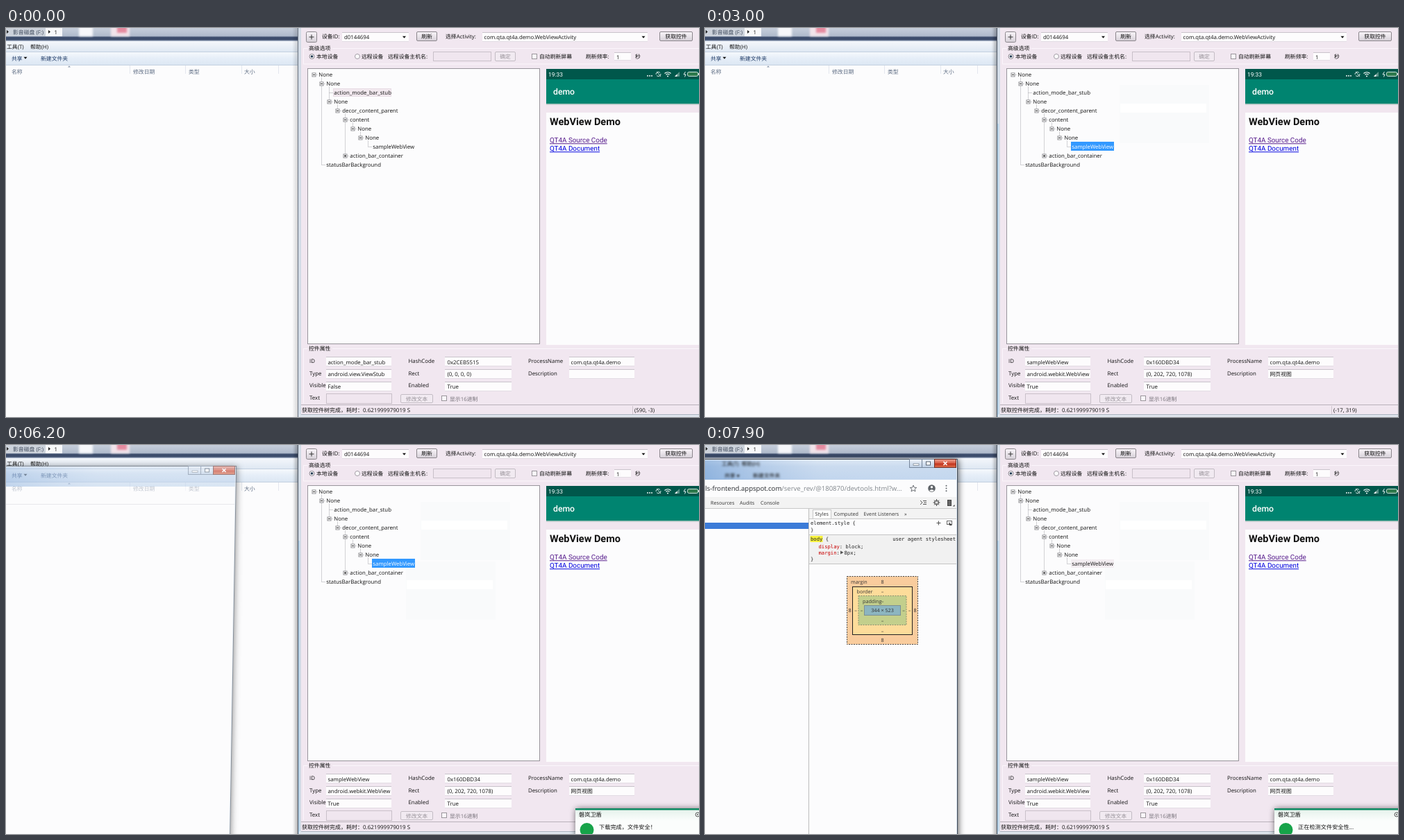
Write an HTML page that moves like this. It is 998 by 561 pixels and loops after 8 s.

```html
<!DOCTYPE html>
<html lang="zh-CN">
<head>
<meta charset="utf-8">
<title>Control inspector</title>
<style>
html, body { margin: 0; width: 100%; height: 100%; overflow: hidden; background: #fcfcfd; }
svg { display: block; width: 998px; height: 561px; }
text {
  font: 7.85px "Open Sans", "Noto Sans CJK SC", "Noto Sans CJK JP", "Noto Sans CJK", sans-serif;
  fill: #111; text-rendering: geometricPrecision; white-space: pre;
}
.mid { text-anchor: middle; }
.end { text-anchor: end; }
.dim { fill: #9a949b; }
.soft { fill: #5c6b82; }
.white { fill: #fff; }
.ph { font-family: Roboto, sans-serif; }
.link { font-size: 9.87px; text-decoration: underline; }
.url { font-size: 9.55px; fill: #80868b; }
.dev { font-size: 7.2px; fill: #333; }
.mono { font-family: "DejaVu Sans Mono", monospace; font-size: 7.2px; fill: #222; }
.blur { filter: blur(1.6px); }
.lift { filter: drop-shadow(2px 2px 1px rgba(0,0,0,.55)); }
.drop { filter: drop-shadow(1px 1px 5px rgba(0,0,0,.65)); }

.a { animation: 8s step-end -20ms infinite; }
.focus { animation-name: focus; }
.before { animation-name: before; }
.after { animation-name: after; }
.sel { animation-name: sel; }
.blurred { animation-name: blurred; }
.menu1 { animation-name: menu1; }
.items1 { animation-name: items1; }
.hover1 { animation-name: hover1; }
.mark1 { animation-name: mark1; }
.menu2 { animation-name: menu2; }
.hover2 { animation-name: hover2; }
.pick2 { animation-name: pick2; }
.mark2 { animation-name: mark2; }
.toast { animation-name: toast; }
.done { animation-name: done; }
.scan { animation-name: scan; }
.win { animation-name: win; }
.frost { animation-name: frost; }
.bar { animation-name: bar; }
.url1 { animation-name: url1; }
.url2 { animation-name: url2; }
.d1 { animation-name: d1; } .d2 { animation-name: d2; } .d3 { animation-name: d3; }
.d4 { animation-name: d4; } .d5 { animation-name: d5; }

@keyframes focus { 0% { opacity: 0 } 25%, 100% { opacity: 1 } }
@keyframes before { 0% { opacity: 1 } 36.25%, 100% { opacity: 0 } }
@keyframes after { 0% { opacity: 0 } 36.25%, 100% { opacity: 1 } }
@keyframes sel { 0% { opacity: 0 } 36.25% { opacity: 1 } 98.75%, 100% { opacity: 0 } }
@keyframes blurred { 0% { opacity: 0 } 98.75%, 100% { opacity: 1 } }
@keyframes menu1 { 0% { opacity: 0 } 25% { opacity: 1 } 35% { opacity: .55 } 36.25% { opacity: .2 } 37.5%, 100% { opacity: 0 } }
@keyframes items1 { 0% { opacity: 0 } 25% { opacity: .13 } 26.25% { opacity: .4 } 27.5% { opacity: .7 } 28.75%, 100% { opacity: 1 } }
@keyframes hover1 {
  0% { opacity: 0; transform: translateY(-13px) }
  28.75% { opacity: 1; transform: translateY(-13px) }
  31.25%, 100% { opacity: 1; transform: none }
}
@keyframes mark1 { 0% { opacity: 0 } 35%, 100% { opacity: 1 } }
@keyframes menu2 { 0% { opacity: 0 } 51.25% { opacity: .5 } 52.5% { opacity: 1 } 63.75%, 100% { opacity: 0 } }
@keyframes hover2 {
  0% { opacity: 0; transform: none }
  56.25% { opacity: 1; transform: translateY(-26px) }
  57.5% { opacity: 1; transform: translateY(-13px) }
  58.75%, 100% { opacity: 1; transform: none }
}
@keyframes pick2 { 0% { opacity: 0 } 63.75% { opacity: .75 } 65% { opacity: .35 } 66.25%, 100% { opacity: 0 } }
@keyframes mark2 { 0% { opacity: 0 } 63.75%, 100% { opacity: 1 } }
@keyframes toast {
  0% { opacity: 0; transform: translateY(44px) }
  68.75% { opacity: 1; transform: translateY(30px) }
  70% { opacity: 1; transform: translateY(18px) }
  71.25% { opacity: 1; transform: translateY(8px) }
  72.5%, 100% { opacity: 1; transform: none }
}
@keyframes done { 0% { opacity: 1 } 80%, 100% { opacity: 0 } }
@keyframes scan { 0% { opacity: 0 } 80%, 100% { opacity: 1 } }
@keyframes win {
  0% { opacity: 0; transform: none }
  77.5% { opacity: .62; transform: translate(-31.5px, 10px) skewX(-.97deg) }
  78.75% { opacity: .85; transform: translate(-25px, 6px) skewX(-.45deg) }
  80% { opacity: .96; transform: translate(-21px, 4px) skewX(-.1deg) }
  81.25% { opacity: 1; transform: translate(-20px, 3px) }
  98.75%, 100% { opacity: 1; transform: none }
}
@keyframes frost { 0% { opacity: 0 } 80%, 100% { opacity: 1 } }
@keyframes bar { 0% { opacity: 0 } 83.75%, 100% { opacity: 1 } }
@keyframes url1 { 0% { opacity: 1 } 87.5%, 100% { opacity: 0 } }
@keyframes url2 { 0% { opacity: 0 } 87.5%, 100% { opacity: 1 } }
@keyframes d1 { 0% { opacity: 0 } 90%, 100% { opacity: 1 } }
@keyframes d2 { 0% { opacity: 0 } 91.25%, 100% { opacity: 1 } }
@keyframes d3 { 0% { opacity: 0 } 92.5%, 100% { opacity: 1 } }
@keyframes d4 { 0% { opacity: 0 } 93.75%, 100% { opacity: 1 } }
@keyframes d5 { 0% { opacity: 0 } 95%, 100% { opacity: 1 } }
</style>
</head>
<body>
<svg id="stage" viewBox="0 0 998 561"></svg>
<script>
const text = (x, y, s, cls = '', extra = '') => `<text x="${x}" y="${y}" class="${cls}" ${extra}>${s}</text>`;
const rect = (x, y, w, h, fill, stroke = 'none', extra = '') =>
  `<rect x="${x}" y="${y}" width="${w}" height="${h}" fill="${fill}" stroke="${stroke}" ${extra}/>`;
const path = (d, stroke, width = 1, fill = 'none', extra = '') =>
  `<path d="${d}" stroke="${stroke}" stroke-width="${width}" fill="${fill}" ${extra}/>`;
const dot = (x, y, r, fill, stroke = 'none') => `<circle cx="${x}" cy="${y}" r="${r}" fill="${fill}" stroke="${stroke}"/>`;
const group = (cls, ...parts) => `<g class="${cls}">${parts.join('')}</g>`;
const anim = (name, ...parts) => group('a ' + name, ...parts);
const grad = (id, dir, ...stops) =>
  `<linearGradient id="${id}" x1="0" y1="0" x2="${dir === 'h' ? 1 : 0}" y2="${dir === 'h' ? 0 : 1}">` +
  stops.map(([o, c, a = 1]) => `<stop offset="${o}" stop-color="${c}" stop-opacity="${a}"/>`).join('') + '</linearGradient>';
const arrow = (x, y) => path(`M${x - 2.5} ${y - 1.3}h5l-2.5 3z`, 'none', 0, '#111');
const button = (x, y, w, h, s, off) =>
  rect(x + .5, y + .5, w - 1, h - 1, off ? '#f1eaf1' : 'url(#btn)', off ? '#c3bcc4' : '#8b868c', 'rx="1.5"') +
  text(x + w / 2, y + h / 2 + 3.2, s, off ? 'mid dim' : 'mid');
const field = (x, y, w, h, off) =>
  off ? rect(x + .5, y + .5, w - 1, h - 1, '#f0e6ef', '#c9c0c9')
      : rect(x, y, w, h, '#fdfcfd') + path(`M${x} ${y + .5}h${w}`, '#c9c3cb') + path(`M${x} ${y + h - .5}h${w}`, '#e2dce4');
const check = (x, y) => rect(x + .5, y + .5, 7, 7, '#faf7fa', '#9a959b');

const defs = '<defs>' +
  grad('btn', 'v', [0, '#f8f4f8'], [.5, '#e9e4ea'], [1, '#d5cfd7']) +
  grad('strip', 'v', [0, '#c6cedb'], [.6, '#b0bbcc'], [.7, '#40506f'], [.88, '#3a4a69'], [1, '#b9c5d8']) +
  grad('menubar', 'v', [0, '#f4f7fb'], [1, '#dfe8f3']) +
  grad('tools', 'v', [0, '#f7fafd'], [.5, '#e6eef8'], [1, '#dce7f3']) +
  grad('shade', 'h', [0, '#000', 0], [1, '#000', .17]) +
  grad('glass', 'v', [0, '#d3e1f2'], [.35, '#b3cbe8'], [1, '#a6c3e6']) +
  grad('shine', 'h', [0, '#6f9dd4', .45], [.45, '#fff', .3], [1, '#dfeaf6', .5]) +
  grad('close', 'v', [0, '#eda292'], [.45, '#d9614a'], [.55, '#c2331d'], [1, '#e0734f']) +
  grad('cap', 'v', [0, '#f1f5fa'], [.5, '#d5e0ee'], [1, '#bfd0e6']) +
  grad('tip', 'v', [0, '#e3f1ea'], [1, '#fbfdfc']) +
  '</defs>';

const explorer = () => rect(0, 0, 421, 561, '#fcfcfd') +
  rect(0, 0, 421, 19, 'url(#strip)') +
  rect(0, 0, 57, 12, '#ccd2db') + rect(57, 0, 24, 12, '#f7f8fa') +
  group('blur', rect(105, -3, 20, 15, '#f6f7fa'), rect(151, -3, 27, 15, '#f1e3ea'), rect(160, -3, 14, 10, '#e58ba0')) +
  path('M1 3l3 2.5l-3 2.5z', 'none', 0, '#222') + path('M61 3l3 2.5l-3 2.5z', 'none', 0, '#222') +
  text(10, 8.5, '影音磁盘 (F:)', '', 'style="fill:#3f4a5c"') + text(69.5, 8.5, '1') +
  rect(0, 19, 421, 15, 'url(#menubar)') + text(1, 30, '工具(T)') + text(35, 30, '帮助(H)') +
  rect(0, 34, 421, 19, 'url(#tools)') + path('M0 34.5h421M0 53.5h421', '#c3d0e0') +
  text(8, 46.5, '共享', '', 'style="fill:#1e3a66"') + arrow(28, 43) +
  text(50, 46.5, '新建文件夹', '', 'style="fill:#1e3a66"') +
  path('M89 56.5l2-2l2 2z', 'none', 0, '#7f8fa5') +
  [178.5, 258.5, 339.5, 392.5].map(x => path(`M${x} 54v12`, '#e3e7ee')).join('') +
  [[8, '名称'], [183, '修改日期'], [263, '类型'], [343, '大小']].map(([x, s]) => text(x, 66, s, 'soft')).join('');

const rows = [
  [0, 'None', '-'], [1, 'None', '-'], [2, 'action_mode_bar_stub'], [2, 'None', '-'], [3, 'decor_content_parent', '-'],
  [4, 'content', '-'], [5, 'None', '-'], [6, 'None', '-'], [7, 'sampleWebView'], [4, 'action_bar_container', '+'], [1, 'statusBarBackground']
];
const colX = d => Math.round(443 + 11.2 * d) + .5;
const rowY = i => 67 + 13 * i;
// last child row of each open node
const lastChild = { 0: 10, 1: 3, 3: 4, 4: 9, 5: 6, 6: 7, 7: 8 };
// pale patch that a closed menu leaves on the tree
const residue = (x, y) => rect(x - 1, y, 129, 84, '#f9fafb') + rect(x, y + 27, 124, 13, '#fff');
const tree = () => {
  let lines = '', nodes = '';
  rows.forEach(([d, label, box], i) => {
    const x = colX(d), y = rowY(i) + .5;
    lines += path(`M${x} ${y}h6`, '#a9a9ad', 1, 'none', 'stroke-dasharray="1 1"');
    if (i in lastChild) lines += path(`M${colX(d + 1)} ${y + 4}V${rowY(lastChild[i])}`, '#a9a9ad', 1, 'none', 'stroke-dasharray="1 1"');
    if (box) nodes += rect(x - 2.5, y - 2.5, 5, 5, '#fff', '#8d8d92') + path(`M${x - 1.5} ${y}h3` + (box === '+' ? `M${x} ${y - 1.5}v3` : ''), '#333');
    nodes += text(x + 6.8, y + 2.3, label);
  });
  return rect(434.5, 58.5, 334, 397, '#fcfcfd', '#98949b') +
    anim('mark1', residue(598, 82)) + anim('mark2', residue(577, 168)) +
    anim('before', rect(471.5, 87.5, 83, 11, '#f2e9ef', '#e8dde5')) +
    anim('blurred', rect(527, 165, 62, 12, '#f3edf1')) +
    lines + nodes +
    anim('sel', rect(527, 164, 62, 13, '#3399ff'), text(colX(7) + 6.8, rowY(8) + 2.8, 'sampleWebView', 'white'));
};

const values = (id, type, shown, hash, box, desc) =>
  text(463.5, 484.5, id) + text(463.5, 502, type) + text(463.5, 519.5, shown) +
  text(635.5, 484.5, hash) + text(635.5, 502, box) + text(813.5, 502, desc);

const props = () =>
  text(436, 465, '控件属性') + path('M470 462.5H998M428.5 462.5h6M428.5 462.5V541', '#fbf6fb') +
  ['ID', 'Type', 'Visible', 'Text'].map((s, i) => text(437, 482.8 + 17.7 * i, s)).join('') +
  ['HashCode', 'Rect', 'Enabled'].map((s, i) => text(579.5, 482.8 + 17.7 * i, s)).join('') +
  text(752, 482.8, 'ProcessName') + text(752, 500.5, 'Description') +
  [474, 492, 510].map(y => field(461, y, 94, 14) + field(632, y, 96, 14)).join('') +
  field(811, 474, 94, 14) + field(811, 492, 94, 14) + field(461, 527, 95, 15, true) +
  text(635.5, 519.5, 'True') + text(813.5, 484.5, 'com.qta.qt4a.demo') +
  anim('before', values('action_mode_bar_stub', 'android.view.ViewStub', 'False', '0x2CEB5515', '(0, 0, 0, 0)', '')) +
  anim('after', values('sampleWebView', 'android.webkit.WebView', 'True', '0x160DBD34', '(0, 202, 720, 1078)', '网页视图')) +
  button(568, 528, 47, 13, '修改文本', true) + check(627, 530) + text(639, 537.5, '显示16进制', '', 'style="fill:#77727a"');

const phone = () =>
  rect(778, 59, 220, 398, '#fcfcfd') + rect(778, 59, 220, 15, '#00574b') + rect(778, 74, 220, 35, '#008470') +
  rect(778, 109, 220, 13, '#f1e6ef') + rect(778, 109, 220, 1.5, '#9dbdb6') +
  text(781, 69.8, '19:33', 'ph white', 'style="font-size:8.4px"') +
  [924, 927, 930].map(x => dot(x, 69, .9, '#fff')).join('') +
  path('M936 67a3.5 3.5 0 0 1 6-2.5M943 66a3.5 3.5 0 0 1-6 2.6M937 63l6 7', '#d9e8e5') +
  path('M948.5 65.5a6.5 6.5 0 0 1 9 0M950.5 67.5a3.6 3.6 0 0 1 5 0', '#fff', 1.1) + dot(953, 69.6, 1, '#fff') +
  path('M963 70l7-7v7z', 'none', 0, '#5c938a') + path('M963 70l3.5-3.5v3.5z', 'none', 0, '#fff') +
  path('M978.5 63l-2.5 4h3l-1.5 3.5', '#fff', .9) +
  rect(981.5, 63.5, 15, 6, '#2f7a4d', '#cfe3dd', 'rx="2"') + rect(997, 65, 1, 3, '#cfe3dd') +
  text(788, 96.3, 'demo', 'ph white', 'style="font-size:12.2px;font-weight:500"') +
  text(783, 140, 'WebView Demo', 'ph', 'style="font-size:14.5px;font-weight:700"') +
  text(783, 165.3, 'QT4A Source Code', 'ph link', 'style="fill:#551a8b"') +
  text(783, 177.3, 'QT4A Document', 'ph link', 'style="fill:#0000e0"');

const inspector = () => rect(412, 0, 9, 561, 'url(#shade)') +
  anim('focus', rect(414, 0, 7, 561, 'url(#shade)')) +
  rect(421, 0, 577, 561, '#f1e7f0') + rect(420, 0, 1, 561, '#6b7481') + rect(421, 0, 4, 561, '#d3dce7') +
  anim('focus', rect(420, 0, 1, 561, '#4b5563'), rect(421, 138, 2, 423, '#b5d2e8')) +
  rect(432.5, 5.5, 15, 15, 'url(#btn)', '#8b868c', 'rx="2"') + path('M436.5 13h7M440 9.5v7', '#333') +
  text(455, 15.3, '设备ID:') + field(484, 6, 96, 14) + text(487, 16, 'd0144694') + arrow(573.5, 13) +
  button(591, 5, 30, 14, '刷新') + text(633, 15.3, '选择Activity:') +
  field(686, 6, 238, 14) + text(688.5, 16, 'com.qta.qt4a.demo.WebViewActivity') + arrow(918, 13) +
  button(941, 5, 48, 14, '获取控件') +
  text(436, 32, '高级选项') + path('M470 29.5H998M428.5 29.5h6M428.5 29.5V52H998', '#fbf6fb') +
  dot(440.5, 41, 3.5, '#fdfcfd', '#86818a') + dot(440.5, 41, 1.8, '#223a52') + text(447, 44, '本地设备') +
  dot(506, 41, 3.5, '#fdfcfd', '#a09aa3') + text(512, 44, '远程设备') + text(550, 44, '远程设备主机名:') +
  field(615, 34, 84, 14, true) + button(704, 34, 30, 14, '确定', true) +
  check(757, 37) + text(768, 44, '自动刷新屏幕') + text(835, 44, '刷新频率:') +
  field(876, 35, 24, 12) + text(879, 44.5, '1') + text(906, 44, '秒') +
  tree() + phone() + props() +
  path('M425 543.5H998', '#b9b1ba') + path('M902.5 545v12', '#cfc6cf') + rect(422, 557.5, 576, 3.5, '#dfe5ed') + path('M425 557.5H998', '#aab3bf') +
  text(426, 554.4, '获取控件树完成，耗时：0.621999979019 S', '', 'style="font-size:8px"') + text(905, 554.4, '', '', 'id="pos"');

const items = ['生成控件QPath', '输入QPath定位', '查找WebView控件', '启动WebView调试', '打开WebView命令行', '切换控件树[2/2]'];
const panel = () => rect(598, 82, 125, 81, '#fafafc', '#d9d9de', 'class="lift"');
const labels = () => items.map((s, i) => text(617, 93 + 13 * i, s)).join('');
const hover = y => rect(598.5, y + .5, 123, 12, '#eaf2fb', '#b4cde8', 'rx="1"');
const menus = () =>
  anim('menu1', panel(), anim('hover1', hover(109)), anim('items1', labels())) +
  '<g transform="translate(-21.5 86)">' +
  anim('menu2', panel(), anim('hover2', hover(122)), labels()) +
  anim('pick2', hover(122), text(617, 132, items[3])) + '</g>';

const toast = () => anim('toast',
  rect(820, 524, 190, 60, '#fbfdfc', 'none', 'class="drop"') + rect(820, 524, 178, 18, 'url(#tip)') + rect(820, 524, 178, 2.5, '#0d8a62'),
  text(825, 536.3, '磐岚卫盾', '', 'style="font-size:8.2px"'),
  dot(996, 533, 3, 'none', '#555') + dot(996, 533, 1, '#555'),
  dot(836.5, 555, 10, '#16a349'),
  anim('done', text(854, 554, '下载完成，文件安全！', '', 'style="font-size:8.2px"')),
  anim('scan', text(854, 554, '正在检测文件安全性...', '', 'style="font-size:8.2px"')));

const dev = (x, y, s, cls = '') => text(x, y, s, 'dev ' + cls);
const mono = (x, y, s, cls = '') => text(x, y, s, 'mono ' + cls);
const layer = (x, y, w, h, fill, line, dash) => rect(x + .5, y + .5, w - 1, h - 1, fill, line, dash ? 'stroke-dasharray="2 1.5"' : '');
const red = s => `<tspan fill="#c80000">${s}</tspan>`;

const devtools = () =>
  anim('d1', rect(-60, 75, 422, 16, '#f3f3f3'), path('M-60 91.5H362', '#c8c8c8'),
    dev(8, 85.6, 'Resources'), dev(50, 85.6, 'Audits'), dev(80, 85.6, 'Console'),
    path('M310 80l3 3l-3 3M314 80.5h5M315 83h4M314 85.5h5', '#555'),
    dot(333.5, 83, 3.2, 'none', '#555'), path('M333.5 78v10M328.5 83h10M330 79.5l7 7M337 79.5l-7 7', '#555', 1), dot(333.5, 83, 1.4, '#f3f3f3'),
    rect(349.5, 79.5, 5, 8, '#666', '#444'), path('M357 88.5h2.5v-2.5z', 'none', 0, '#333')) +
  anim('d2', rect(-60, 112, 209, 9, '#3b7bd8'), path('M149.5 92V561', '#bdbdbd')) +
  anim('d3', rect(150, 92, 212, 14, '#f3f3f3'), path('M150 106.5H362', '#c8c8c8'),
    rect(155.5, 93.5, 26, 13, '#fff', '#c8c8c8'), dev(158.5, 102, 'Styles'), dev(185.5, 102, 'Computed'), dev(228.5, 102, 'Event Listeners'), dev(287, 102, '»')) +
  anim('d4', mono(152, 115, 'element.style {'), mono(152, 124.5, '}'),
    path('M333.5 112.5h6M336.5 109.5v6', '#555'), rect(348.5, 109.5, 7, 5, 'none', '#666'), path('M351 111l5 5h-4z', 'none', 0, '#444'),
    rect(150, 129, 212, 42, '#f1f1f1'), path('M150 129.5H362M150 171.5H362', '#c4c4c4'),
    rect(151.5, 131, 18, 9, '#f7f23c'), mono(152, 138, 'body {'), mono(361, 138, 'user agent stylesheet', 'end'),
    mono(163.5, 148.5, red('display') + ': block;'), mono(163.5, 157.5, red('margin') + ':'),
    path('M195 152.5l4.5 2.5l-4.5 2.5z', 'none', 0, '#555'), mono(200.5, 157.5, '8px;'), mono(152, 166.5, '}')) +
  anim('d5', layer(204, 189, 103, 99, '#f9cc9d', '#444', true), layer(212, 204, 87, 70, '#fddc9a', '#222'),
    layer(220.5, 217, 70, 43, '#c3cf8c', '#8a8f70', true), layer(229, 231, 53, 15, '#8cb5c0', '#7d8f94'),
    dev(210, 199.5, 'margin'), dev(218.5, 213.8, 'border'), dev(227, 227.8, 'padding'),
    [[199.5, '8'], [213.8, '–'], [227.8, '–'], [256, '–'], [270.5, '–'], [284.3, '8']].map(([y, s]) => dev(255.5, y, s, 'mid')).join(''),
    dev(255.5, 241.3, '344 × 523', 'mid'),
    [[208.5, '8'], [217, '–'], [225.5, '–'], [286, '–'], [294.5, '–'], [302.5, '8']].map(([x, s]) => dev(x, 241.3, s, 'mid')).join(''));

const host = s => `<tspan fill="#26292d">${s}</tspan>`;
const browser = () => anim('win',
  rect(-60, 20, 424, 600, '#a9c6e6', 'none', 'class="drop"'),
  rect(-60, 20, 424, 31, 'url(#glass)') + rect(0, 20, 364, 31, 'url(#shine)'),
  anim('frost', group('blur', text(24, 30, '工具(T)  帮助(H)'), text(28, 47, '共享 ▾'), text(69, 47, '新建文件夹'))),
  path('M-60 20.5H363.5V561', '#3f4a58') + path('M-60 21.5H362.5V561', '#eef3f8', .8),
  rect(294.5, 20.5, 18, 12, 'url(#cap)', '#75859a'), rect(312.5, 20.5, 18, 12, 'url(#cap)', '#75859a'), rect(330.5, 20.5, 31, 12, 'url(#close)', '#6e3029'),
  rect(300, 27, 8, 2.5, '#fff', '#5b6675', 'stroke-width=".6"'), rect(318.5, 24, 6, 5, '#fff', '#5b6675'), path('M343.5 24l5 5M348.5 24l-5 5', '#fff', 1.6),
  rect(-60, 50, 422, 511, '#fcfcfd'), path('M-60 75.5H362', '#dadce0'),
  anim('bar',
    anim('url1', text(284.5, 65.7, host('appspot.com') + '/serve_rev/@180870/devtools.html?ws=127.0...', 'url end')),
    anim('url2', text(283.5, 65.7, host('ls-frontend.appspot.com') + '/serve_rev/@180870/devtools.html?w...', 'url end')),
    path('M300 58l1.3 3.2l3.4.2l-2.6 2.2l.9 3.4l-3-1.9l-3 1.9l.9-3.4l-2.6-2.2l3.4-.2z', '#5f6368', .9),
    dot(326.5, 62.5, 5.3, '#5f6368'), dot(326.5, 60.7, 1.7, '#fff'), path('M323 65.8q3.5-3 7 0q-3.5 2.4-7 0z', 'none', 0, '#fff'),
    [58.8, 62.5, 66.2].map(y => dot(347.5, y, 1, '#5f6368')).join('')),
  devtools());

document.getElementById('stage').innerHTML = defs + explorer() + inspector() + menus() + browser() + toast();

// pointer read-out: two bursts of movement, one step each 100 ms
const pos = document.getElementById('pos');
const clamp = (v, max) => Math.max(0, Math.min(max, v));
function tick(now) {
  const k = Math.floor(((now + 20) % 8000) / 100);
  const p = (clamp(k - 1, 7) + clamp(k - 9, 6)) / 13;
  pos.textContent = `(${Math.round(590 - 607 * p)}, ${Math.round(322 * p - 3)})`;
  requestAnimationFrame(tick);
}
tick(performance.now());
</script>
</body>
</html>
```
